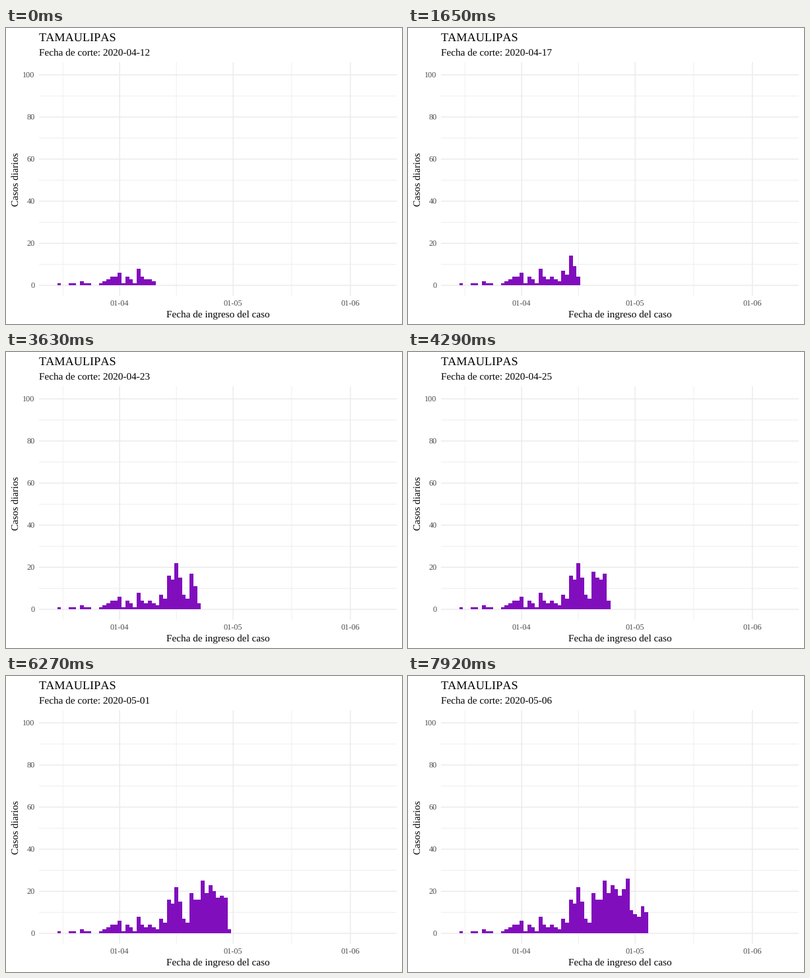
Recreate the animation shown at these times as a matplotlib script. Size 600 by 450 pixels, loop 8 s.

```python
import matplotlib.pyplot as plt
import numpy as np
from matplotlib.animation import FuncAnimation
from matplotlib.collections import LineCollection
from matplotlib.patches import Polygon

W, H, DPI = 600, 450, 100
LOOP, STEP, TICK = 8000, 330, 20      # ms
PX = 72 / DPI                         # points per pixel

LEFT, RIGHT, TOP, BOTTOM = 50, 592, 52, 407
DAY0, DAY_W = 172.2, 5.73             # x of April 1, width of one day
ZERO, UNIT = 391.3, 3.2               # y of zero cases, height of one case

# Cases per day once fully reported, from March 16
CASES = np.array([
    1, 0, 0, 1, 1, 0, 2, 1, 1, 0, 0, 1, 2, 3, 4, 4, 6, 1, 4, 3, 1, 8, 4, 3, 4,
    3, 2, 7, 5, 16, 14, 22, 15, 7, 5, 19, 16, 16, 25, 19, 23, 21, 18, 21, 26,
    11, 9, 8, 15, 15])
FIRST_DAY = -16                       # March 16, relative to April 1
FIRST_CUTOFF = 11                     # April 12

plt.rcParams.update({
    "font.family": "Liberation Serif",
    "text.kerning_factor": 6,
    "text.hinting": "none",
})

days = FIRST_DAY + np.arange(len(CASES))


def day_x(day):
    return DAY0 + DAY_W * day


def case_y(n):
    return ZERO - UNIT * n


def reported(step):
    """Counts known at a cut-off: the share rises with the age of the day."""
    age = np.clip(FIRST_CUTOFF + step - days, 0, None) ** 3.0
    return np.round(CASES * age / (age + 4))


def outline(counts):
    # Whole-pixel edges keep the bars crisp
    edges = np.round(day_x(np.append(days, days[-1] + 1) - 0.5))
    xs = np.repeat(edges, 2)
    ys = np.round(case_y(np.concatenate([[0], np.repeat(counts, 2), [0]])))
    return np.column_stack([xs, ys])


def cutoff_label(step):
    month, day = divmod(FIRST_CUTOFF + step, 30)
    return f"Fecha de corte: 2020-{month + 4:02d}-{day + 1:02d}"


fig = plt.figure(figsize=(W / DPI, H / DPI), dpi=DPI, facecolor="white")
ax = fig.add_axes([0, 0, 1, 1])
ax.set_xlim(0, W)
ax.set_ylim(H, 0)
ax.axis("off")


def label(x, y, text, size, color="black", **kw):
    return ax.text(x, y, text, fontsize=size * PX, color=color,
                   va="baseline", **kw)


def grid(at_days, at_cases, width):
    lines = [[(day_x(d), TOP), (day_x(d), BOTTOM)] for d in at_days]
    lines += [[(LEFT, case_y(n)), (RIGHT, case_y(n))] for n in at_cases]
    art = LineCollection(lines, colors="#EBEBEB", linewidths=width * PX,
                         capstyle="butt", zorder=1)
    art.set_snap(False)
    ax.add_collection(art, autolim=False)


grid((-15, 15, 45.5), range(10, 100, 20), 0.8)
grid((0, 30, 61), range(0, 101, 20), 1.5)

bars = Polygon(outline(reported(0)), closed=True, facecolor="#810EBD",
               edgecolor="none", linewidth=0, zorder=2)
bars.set_snap(False)
ax.add_patch(bars)

label(50, 20.6, "TAMAULIPAS", 18.3)
subtitle = label(50, 42, cutoff_label(0), 15.25)
label(321, 440, "Fecha de ingreso del caso", 15.25, ha="center")
label(18.6, 230, "Casos diarios", 15.25, rotation=90,
      rotation_mode="anchor", ha="center")
for month, day in enumerate((0, 30, 61), 4):
    label(day_x(day), 423.2, f"01-{month:02d}", 12.2, "#4D4D4D", ha="center")
for n in range(0, 101, 20):
    label(43.7, case_y(n) + 4.4, str(n), 12.2, "#4D4D4D", ha="right")


def update(frame):
    step = (frame * TICK + TICK - 1) // STEP
    bars.set_xy(outline(reported(step)))
    subtitle.set_text(cutoff_label(step))
    return bars, subtitle


anim = FuncAnimation(fig, update, frames=LOOP // TICK, interval=TICK,
                     repeat=True, repeat_delay=0, blit=False)
plt.show()
```
